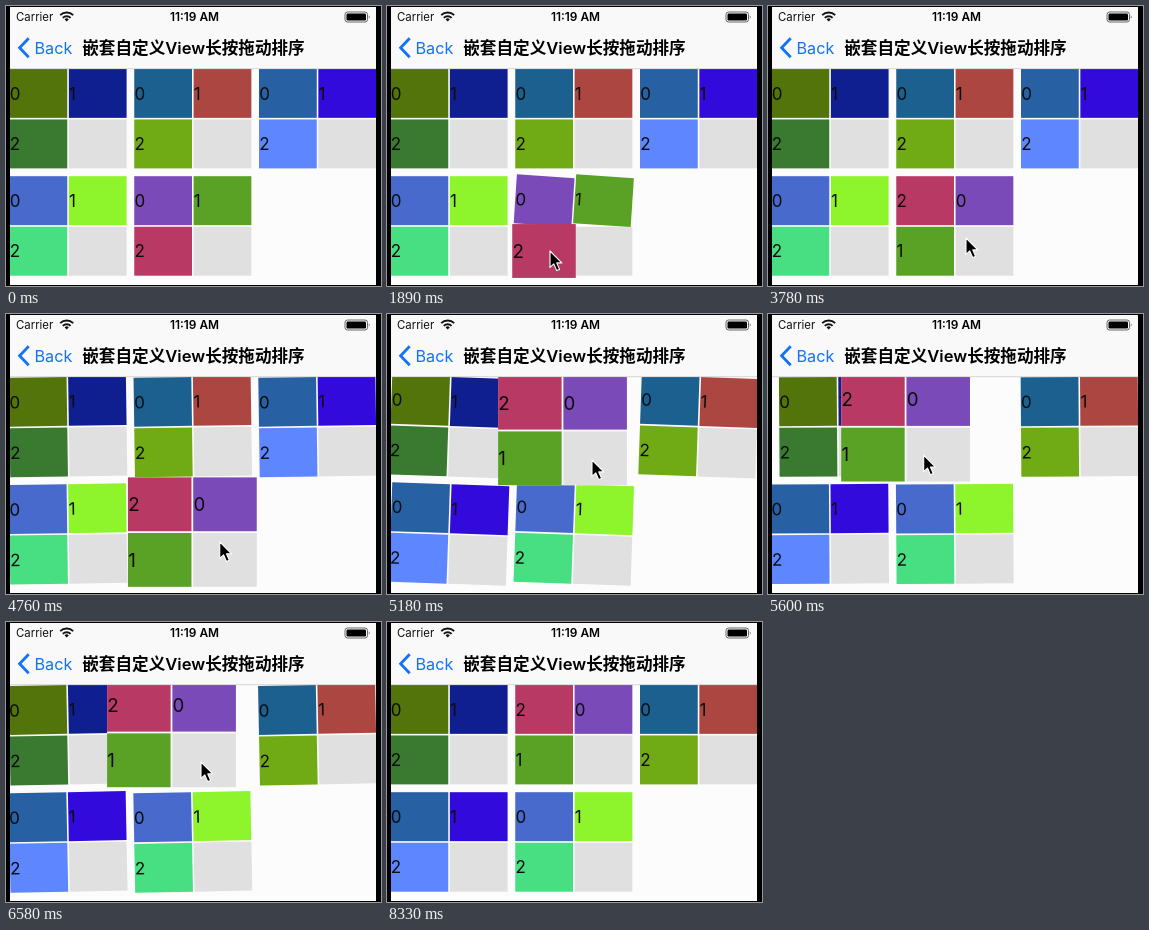
An HTML page that plays this animation: 375x280 px, repeating every 8400 ms.

```html
<!DOCTYPE html>
<html lang="zh">
<head>
<meta charset="utf-8">
<title>Drag to reorder</title>
<style>
  html, body { margin: 0; width: 100%; height: 100%; overflow: hidden; background: #000; }
  svg { display: block; width: 375px; height: 280px; }
  text { font-family: Inter, "Noto Sans CJK SC", "Noto Sans CJK", sans-serif; fill: #000; }
  .digit { font-size: 17px; fill: #0b0b0b; }
  .status { font-size: 11.4px; fill: #111; }
  .time { font-size: 11.9px; font-weight: 600; }
  .back { font-size: 16.2px; fill: #1273f5; }
  .title { font-size: 16.6px; font-weight: 600; }
</style>
</head>
<body>
<svg viewBox="0 0 375 280">
  <defs>
    <clipPath id="screen"><rect x="4" y="1" width="366" height="278"/></clipPath>
  </defs>
  <g clip-path="url(#screen)">
    <rect width="375" height="280" fill="#fcfcfc"/>
    <g id="board"></g>
    <rect width="375" height="63" fill="#f9f9f9"/>
    <path d="M0 62.7H375" stroke="#bdbdbd" stroke-width=".6"/>

    <text class="status" x="10" y="15">Carrier</text>
    <g fill="none" stroke="#111" stroke-width="1.9">
      <path d="M54.2 9.2a9.2 9.2 0 0 1 13 0"/>
      <path d="M56.8 11.8a5.5 5.5 0 0 1 7.8 0"/>
    </g>
    <path d="M60.7 15.6l-2.1-2.2a3 3 0 0 1 4.2 0z" fill="#111"/>
    <text class="time" x="188.5" y="15" text-anchor="middle">11:19 AM</text>
    <rect x="339" y="6" width="22.5" height="10" rx="2.5" fill="none" stroke="#555" stroke-width=".9"/>
    <rect x="340.5" y="7.5" width="19.5" height="7" rx="1.2"/>
    <path d="M362.8 9.2q1.8 1.8 0 3.6z" fill="#555"/>

    <path d="M22.7 32.3L13.6 41.8L22.7 51.3" fill="none" stroke="#1273f5" stroke-width="2.8"/>
    <text class="back" x="28.5" y="48">Back</text>
    <text class="title" x="187.5" y="48" text-anchor="middle">嵌套自定义View长按拖动排序</text>

    <path id="cursor" d="M0 0V16.4L3.8 12.9L6.7 19.6L9.6 18.4L6.7 11.9H11.8Z"
      stroke="#fff" stroke-width="1.1" stroke-linejoin="round"/>
  </g>
</svg>
<script>
const LOOP = 8400;
const HOP = 270;      // neighbours making room
const GLIDE = 450;    // one cursor move
const LAG = 100;      // held item behind the cursor
const GRIP = 150;     // lifting and dropping
const SHAKE = 250;    // one shake period
const LIFT = 0.1;
const GAP = 1.6, CELL = [57.75, 48.95];
const PALETTES = [
  ['#52740a', '#101f90', '#3a7a30'],
  ['#1c6090', '#ac4640', '#70aa14'],
  ['#2860a4', '#320adc', '#5d86ff'],
  ['#486acc', '#8ef42c', '#48de82'],
  ['#7a4ab8', '#5aa226', '#b83a64']
];

// Slot centres: groups on the board, cells relative to their group.
const groupSlot = i => [62.05 + i % 3 * 124.75, 112.65 + Math.floor(i / 3) * 107.3];
const cellSlot = i => [i % 2, Math.floor(i / 2)].map((n, axis) => (n - 0.5) * (CELL[axis] + GAP));

const clamp = u => Math.min(1, Math.max(0, u));
const ease = u => u * u * (3 - 2 * u);
const mix = (a, b, k) => a.map((v, i) => v + (b[i] - v) * k);

// Position after a list of { at, to } moves, each eased over the same duration.
const follow = (start, moves, duration, t) =>
  moves.reduce((p, { at, to }) => mix(p, to, ease(clamp((t - at) / duration))), start);

// Moving one item through an ordered list gives every item its own moves.
function reorder(count, held, drops, slot) {
  const order = [...Array(count).keys()];
  const moves = order.map(() => []);
  for (const [at, index] of drops) {
    order.splice(order.indexOf(held), 1);
    order.splice(index, 0, held);
    order.forEach((item, i) => moves[item].push({ at, to: slot(i) }));
  }
  return (item, t) => follow(slot(item), moves[item], HOP, t);
}

const groupDrag = {
  held: 4, start: 4410, end: 6950, peak: 175, angle: 2.2, grab: [29.5, 29.5],
  home: reorder(5, 4, [[4890, 1], [5560, 0], [5927, 1]], groupSlot)
};
const cellDrag = {
  held: 2, start: 1260, end: 3200, peak: 140, angle: 3.8, grab: [6, 0],
  home: reorder(3, 2, [[2260, 0]], cellSlot)
};

const cursorMoves = [
  [630, 163, 245], [1980, 160, 196], [3250, 198, 232], [4100, 216, 249], [4630, 205, 146],
  [5200, 154, 141], [5830, 195, 140], [6590, 214, 141]
].map(([at, ...to]) => ({ at, to }));
const cursorAt = t => follow([170, 284], cursorMoves, GLIDE, t);

function shake({ start, end, peak, angle }, t) {
  if (t < start || t > end + GRIP) return 0;
  const u = ((t - peak) / SHAKE % 1 + 1) % 1;
  return angle * (Math.abs(u - 0.5) * 4 - 1);
}

function place(el, [x, y], angle = 0, scale = 1) {
  el.setAttribute('transform', `translate(${x} ${y}) rotate(${angle}) scale(${scale})`);
}

// Shakes the resting items and ties the held one to the cursor.
function arrange(items, drag, origin, t) {
  const angle = shake(drag, t);
  const grip = ease(clamp((t - drag.start) / GRIP)) * (1 - ease(clamp((t - drag.end) / GRIP)));
  const hand = cursorAt(t - LAG).map((v, i) => v - drag.grab[i] - origin[i]);
  items.forEach((el, i) => {
    const home = drag.home(i, t);
    if (i === drag.held) place(el, mix(home, hand, grip), 0, 1 + LIFT * grip);
    else place(el, home, angle);
  });
}

function add(parent, tag, attrs = {}, text = '') {
  const el = document.createElementNS('http://www.w3.org/2000/svg', tag);
  for (const name in attrs) el.setAttribute(name, attrs[name]);
  el.textContent = text;
  return parent.appendChild(el);
}

function box(parent, [w, h], fill) {
  const el = add(parent, 'g');
  add(el, 'rect', { x: -w / 2, y: -h / 2, width: w, height: h, fill });
  return el;
}

const board = document.getElementById('board');
const cursor = document.getElementById('cursor');
const groups = PALETTES.map(colors => {
  const el = box(board, CELL.map(v => v * 2 + GAP), '#fcfcfc');
  place(box(el, CELL, '#e0e0e0'), cellSlot(3));
  const cells = colors.map((color, i) => {
    const cell = box(el, CELL, color);
    add(cell, 'text', { class: 'digit', x: -CELL[0] / 2 + 0.2, y: 6.2 }, String(i));
    place(cell, cellSlot(i));
    return cell;
  });
  return { el, cells };
});

function draw(t) {
  arrange(groups.map(g => g.el), groupDrag, [0, 0], t);
  arrange(groups[groupDrag.held].cells, cellDrag, groupSlot(groupDrag.held), t);
  place(cursor, cursorAt(t));
  cursor.style.display = t >= 630 && t < 8320 ? '' : 'none';
}

const start = performance.now();
function tick() {
  draw((performance.now() - start) % LOOP);
  requestAnimationFrame(tick);
}
tick();
</script>
</body>
</html>
```
